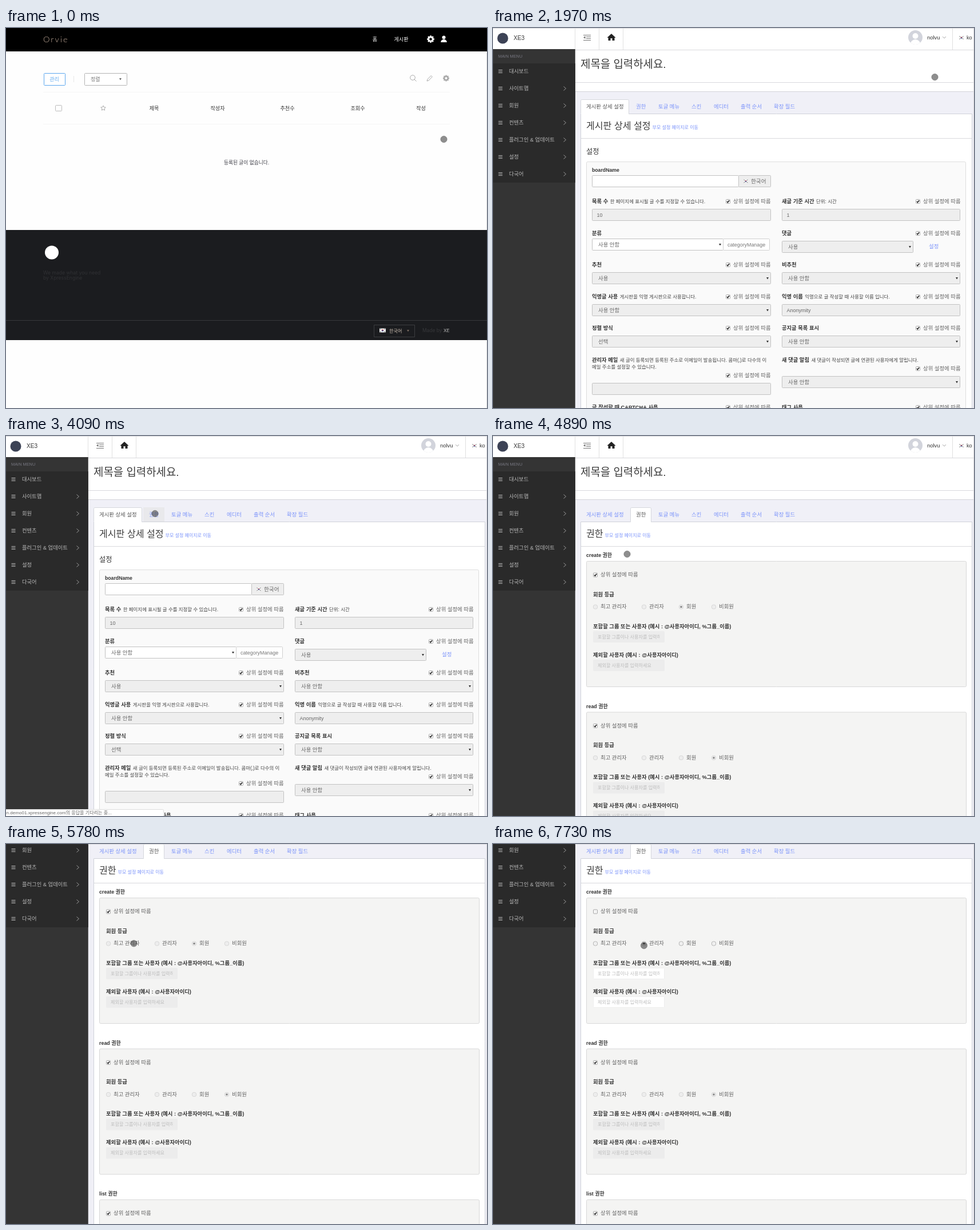
Recreate the animation shown at these times as an HTML page with a canvas. Size 841x666 px, loop 8 s.

```html
<!DOCTYPE html>
<html lang="ko">
<head>
<meta charset="utf-8">
<style>
html, body { margin: 0; width: 100%; height: 100%; overflow: hidden; background: #fff }
canvas { display: block }
</style>
</head>
<body>
<canvas id="stage" width="841" height="666"></canvas>
<script>
const W = 841, H = 666, LOOP = 8000, SIDE = 143.75;
const c = document.getElementById('stage').getContext('2d');
const SANS = '"Liberation Sans", "Noto Sans CJK KR", sans-serif';
const INTER = 'Inter, sans-serif';
const BLUE = '#7b93fa', INK = '#333', GRAY = '#626262', LINE = '#d9d9dd';

// Basic drawing helpers
function text(s, x, y, size = 9.4, color = GRAY, weight = 400, align = 'left', family = SANS) {
  c.font = `${weight} ${size}px ${family}`;
  c.fillStyle = color;
  c.textAlign = align;
  c.fillText(s, x, y);
  return c.measureText(s).width;
}
function rect(x, y, w, h, fill) {
  c.fillStyle = fill;
  c.fillRect(x, y, w, h);
}
function box(x, y, w, h, fill, border, radius = 0) {
  c.beginPath();
  c.roundRect(x + .5, y + .5, w - 1, h - 1, radius);
  c.fillStyle = fill;
  c.fill();
  stroke(border);
}
function stroke(color, width = 1) {
  c.strokeStyle = color;
  c.lineWidth = width;
  c.stroke();
}
function path(points, color, width = 1) {
  c.beginPath();
  for (let i = 0; i < points.length; i += 2) c.lineTo(points[i], points[i + 1]);
  stroke(color, width);
}
function poly(points, color) {
  c.beginPath();
  for (let i = 0; i < points.length; i += 2) c.lineTo(points[i], points[i + 1]);
  c.fillStyle = color;
  c.fill();
}
function disc(x, y, r, color, from = 0, to = 2 * Math.PI) {
  c.beginPath();
  c.arc(x, y, r, from, to);
  c.fillStyle = color;
  c.fill();
}
const caret = (x, y, color) => poly([x - 2, y - 1.5, x + 2, y - 1.5, x, y + 2], color);
const chevron = (x, y, color) => path([x - 2, y - 3.5, x + 2, y, x - 2, y + 3.5], color);

// Icons
function gear(x, y, r, color, hole) {
  for (let i = 0; i < 4; i++) {
    const a = i * Math.PI / 4, dx = r * Math.cos(a), dy = r * Math.sin(a);
    path([x - dx, y - dy, x + dx, y + dy], color, r * .45);
  }
  disc(x, y, r * .78, color);
  disc(x, y, r * .36, hole);
}
function star(x, y, r, color) {
  c.beginPath();
  for (let i = 0; i < 10; i++) {
    const a = i * Math.PI / 5 - Math.PI / 2, d = i % 2 ? r * .48 : r;
    c.lineTo(x + d * Math.cos(a), y + d * Math.sin(a));
  }
  c.closePath();
  stroke(color);
}
function flag(x, y, w = 8, h = 6) {
  rect(x - w / 2, y - h / 2, w, h, '#f4f4f4');
  disc(x, y, h / 4, '#b5424b', Math.PI, 0);
  disc(x, y, h / 4, '#34498a', 0, Math.PI);
  for (const i of [-1, 1]) for (const j of [-1, 1])
    path([x + i * w * .42, y + j * h * .42, x + i * w * .27, y + j * h * .27], '#444');
}
function checkbox(x, y, on = true) {
  box(x - 4, y - 4, 8, 8, on ? '#fff' : '#f4f4f4', '#a9a9a9', 1);
  if (on) path([x - 2, y, x - .6, y + 1.8, x + 2.2, y - 2], '#222', 1.5);
}
function radio(x, y, on, enabled) {
  disc(x, y, 4, enabled ? '#aaa' : '#d2d2d2');
  disc(x, y, 3.2, enabled ? '#f0f0f0' : '#ededed');
  if (on) disc(x, y, 1.8, enabled ? '#333' : '#888');
}

function boardPage() {
  rect(0, 0, W, H, '#fefefe');
  rect(840, 41, 1, H, '#e2e2e2');
  rect(0, 0, W, 41, '#000');
  c.letterSpacing = '2px';
  text('Orvie', 65, 25, 14.5, '#c4ac9b', 300, 'left', 'Lato, sans-serif');
  c.letterSpacing = '0px';
  text('홈', 645, 23, 9, '#fff', 500, 'center');
  text('게시판', 691, 23, 9, '#fff', 500, 'center');
  gear(742.5, 19.5, 6.3, '#fff', '#000');
  disc(765.5, 16.5, 3, '#fff');
  disc(765.5, 25, 5.3, '#fff', Math.PI, 0);

  box(66, 79, 38, 22, '#fff', '#5ba6ee', 1);
  text('관리', 84.5, 93, 9, '#62abf0', 400, 'center');
  rect(118, 84, 1, 11, '#e8e8e8');
  box(137, 79, 75, 22, '#fff', '#b4b4b4', 1);
  text('정렬', 148, 93, 9, '#777');
  caret(200, 89.5, '#666');

  c.beginPath();
  c.arc(711, 87, 4.3, 0, 7);
  stroke('#aaa');
  path([714, 90, 717.5, 93.5], '#aaa');
  c.beginPath();
  c.moveTo(736, 93);
  c.lineTo(737, 89.8); c.lineTo(743.2, 83.5); c.lineTo(745.2, 85.5); c.lineTo(739, 92);
  c.closePath();
  stroke('#aaa');
  gear(769.5, 88, 5.5, '#aaa', '#fefefe');

  rect(65, 112, 711, 1, '#f5f5f5');
  rect(65, 168, 711, 1, '#f5f5f5');
  box(86, 135, 12, 11, '#fff', '#bbb', 1);
  star(170, 140.5, 4.5, '#aaa');
  [['제목', 259], ['작성자', 370], ['추천수', 492], ['조회수', 615], ['작성', 725.5]]
    .forEach(([s, x]) => text(s, x, 144, 9.1, '#333', 400, 'center'));
  text('등록된 글이 없습니다.', 420.5, 239, 8.7, '#3b3b44', 500, 'center');

  rect(0, 354, W, 193, '#1b1c1f');
  rect(0, 512, W, 1, '#37383b');
  disc(80, 393.5, 12, '#fff');
  text('We made what you need', 65, 432, 8.6, '#303134', 400, 'left', INTER);
  text('by XpressEngine', 65, 441, 8.6, '#303134', 400, 'left', INTER);
  box(643, 520, 72, 22, '#1b1c1f', '#3c3d40');
  flag(658.5, 530, 11, 7);
  text('한국어', 670, 534, 8.1, '#d0c2b4');
  caret(703, 530.5, '#77695f');
  text('Made by', 728, 533, 8.4, '#37383b', 400, 'left', INTER);
  text('XE', 775.5, 533, 8.2, '#b9b9b9', 400, 'right', INTER);
}

const MENU = ['대시보드', '사이트맵', '회원', '컨텐츠', '플러그인 & 업데이트', '설정', '다국어'];
const TABS = [['게시판 상세 설정', 163], ['권한', 250], ['토글 메뉴', 289], ['스킨', 347],
  ['에디터', 386], ['출력 순서', 433], ['확장 필드', 491]];

function adminFrame(active, hovered) {
  rect(0, 0, W, 1000, '#fff');
  rect(0, 0, SIDE, 1, LINE);
  disc(17, 18, 9.5, '#3d4356');
  text('XE3', 36, 21, 10.1, INK);
  for (const x of [143, 185, 227, 803]) rect(x, 0, 1, 38, '#e0e0e0');
  for (let i = 0; i < 4; i++) {
    const indent = i == 1 || i == 2 ? 5 : 0;
    rect(158 + indent, 12 + i * 3, 13 - indent, 1, '#777');
  }
  poly([158, 16.5, 161.5, 14, 161.5, 19], '#777');
  poly([199.5, 17, 207, 10, 214.5, 17, 212.5, 17, 212.5, 22, 208.5, 22, 208.5, 18, 205.5, 18,
    205.5, 22, 201.5, 22, 201.5, 17], '#222');
  c.save();
  c.beginPath();
  c.arc(738.5, 16.5, 12.5, 0, 7);
  c.clip();
  rect(725, 3, 27, 27, '#d2d4dc');
  disc(738.5, 14, 5, '#fff');
  disc(738.5, 29, 9, '#fff');
  c.restore();
  text('nolvu', 759, 20, 9.4, INK);
  path([786, 15, 789, 18, 792, 15], '#aaa');
  flag(819, 17);
  text('ko', 828, 20, 9.2, INK);

  rect(SIDE, 38, W, 1, LINE);
  text('제목을 입력하세요.', 153, 70, 18.9, '#3c3c3c', 300);
  rect(SIDE, 95, W, 1, LINE);
  rect(SIDE, 111, W, 1000, '#f0f0f7');
  rect(SIDE, 111, W, 1, '#d3d3da');

  rect(0, 37, SIDE, 1000, '#343434');
  rect(0, 62, SIDE, 209, '#2a2a2a');
  text('MAIN MENU', 9, 52, 7.4, '#777781');
  MENU.forEach((s, i) => {
    const y = 76 + i * 30;
    for (const d of [-3, -.5, 2]) rect(9.5, y + d, 7, 1, '#b4b4b4');
    text(s, 28, y + 3, 9.3, '#b8b8b8');
    if (i) chevron(125.5, y, '#999');
  });

  box(153, 150, 685, 1000, '#fff', '#d0d2d9');
  if (hovered) rect(240, 125, 37, 25, '#e9e9ec');
  const [left, width] = active ? [240, 37] : [153, 85];
  box(left, 125, width, 27, '#fff', '#d5d7dd', 2);
  rect(left + 1, 150, width - 2, 3, '#fff');
  TABS.forEach(([s, x], i) => text(s, x, 141, 9.4, i == active ? '#555' : BLUE));
  const title = TABS[active][0];
  const w = text(title, 163, 177, 16.1, '#3c3c3c', 300);
  text('부모 설정 페이지로 이동', 163 + w + 3, 177, 8, BLUE);
  rect(154, 193, 683, 1, LINE);
}

function field(x, y, w, value, { select = false, off = true } = {}) {
  box(x, y, w, 21, off ? '#eee' : '#fff', '#c2c2c2', 1);
  text(value, x + (select ? 11 : 8.5), y + 14, select ? 9.4 : 9, '#666');
  if (select) caret(x + w - 6, y + 10.5, '#333');
}
function label(x, y, name, note = '') {
  const w = text(name, x, y, 9.3, INK, 700);
  text(note, x + w + 3.5, y, 8.45, '#444');
}
function inherit(x, y) {
  checkbox(x + 238, y - 3);
  text('상위 설정에 따름', x + 247, y);
}

function settingsForm() {
  const L = 173, R = 505, list = { select: true };
  text('설정', 163, 221, 12.2, INK);
  box(163, 234, 664, 800, '#fafafa', '#ddd', 2);
  text('boardName', L, 252, 8.7, INK, 700);
  box(L, 258, 257, 21, '#fff', '#c2c2c2', 1);
  box(429, 258, 57, 21, '#eee', '#c2c2c2', 1);
  flag(442, 268.5);
  text('한국어', 451, 272, 9.6, '#666');

  const rows = [
    [L, 0, '목록 수', '한 페이지에 표시될 글 수를 지정할 수 있습니다.', '10'],
    [R, 0, '새글 기준 시간', '단위: 시간', '1'],
    [L, 2, '추천', '', '사용', list],
    [R, 2, '비추천', '', '사용 안함', list],
    [L, 3, '익명글 사용', '게시판을 익명 게시판으로 사용합니다.', '사용 안함', list],
    [R, 3, '익명 이름', '익명으로 글 작성할 때 사용할 이름 입니다.', 'Anonymity'],
    [L, 4, '정렬 방식', '', '선택', list],
    [R, 4, '공지글 목록 표시', '', '사용 안함', list],
    [L, 6.5, '글 작성할 때 CAPTCHA 사용', '', ''],
    [R, 6.5, '태그 사용', '', '']
  ];
  for (const [x, row, name, note, value, kind] of rows) {
    const y = Math.round(307 + row * 55.5);
    label(x, y, name, note);
    inherit(x, y);
    field(x, y + 10, x == L ? 313 : 312, value, kind);
  }
  label(L, 363, '분류');
  field(L, 369, 230, '사용 안함', { select: true, off: false });
  box(402, 369, 82, 21, '#fff', '#d0d0d0', 1);
  text('categoryManage', 410, 383, 8.9, '#777');
  label(R, 363, '댓글');
  inherit(R, 363);
  field(R, 373, 230, '사용', list);
  text('설정', 762, 386, 9.4, BLUE);

  label(L, 585, '관리자 메일', '새 글이 등록되면 등록된 주소로 이메일이 발송됩니다. 콤마(,)로 다수의 이');
  text('메일 주소를 설정할 수 있습니다.', L, 597, 8.45, '#444');
  inherit(L, 612);
  field(L, 622, 313, '');
  label(R, 585, '새 댓글 알림', '새 댓글이 작성되면 글에 연관된 사용자에게 알립니다.');
  inherit(R, 600);
  field(R, 610, 312, '사용 안함', list);
}

function hintField(y, hint, enabled) {
  c.save();
  box(175, y, 125, 20, enabled ? '#fff' : '#ececec', enabled ? '#eee' : '#ececec', 1);
  c.beginPath();
  c.rect(183, y, 109, 20);
  c.clip();
  text(hint, 183, y + 12.5, 8.1, '#bcbcbc');
  c.restore();
}
function permission(name, y, chosen, enabled) {
  text(name + ' 권한', 163, y + 212, 8.9, INK, 700);
  box(163, y + 219, 665, 221, '#f4f4f3', '#d8d8d8', 2);
  checkbox(179, y + 243.5, !enabled);
  text('상위 설정에 따름', 188, y + 246);
  text('회원 등급', 175, y + 280.5, 9.3, INK, 700);
  [['최고 관리자', 179], ['관리자', 264], ['회원', 329], ['비회원', 386]].forEach(([s, x], i) => {
    radio(x, y + 299.5, i == chosen, enabled);
    text(s, x + 9, y + 302);
  });
  text('포함할 그룹 또는 사용자 (예시 : @사용자아이디, %그룹_이름)', 175, y + 336.5, 9.33, INK, 700);
  hintField(y + 342, '포함할 그룹이나 사용자를 입력하세요', enabled);
  text('제외할 사용자 (예시 : @사용자아이디)', 175, y + 386.5, 9.33, INK, 700);
  hintField(y + 392, '제외할 사용자를 입력하세요', enabled);
}

function statusBar() {
  box(-2, 654, 278, 14, '#fff', '#ddd', 2);
  text('qorun.demo01.xpressengine.com의 응답을 기다리는 중...', 185, 663, 8.1, '#666', 400, 'right');
}

// Motion
const clamp = p => Math.min(1, Math.max(0, p));
const smooth = p => p * p * (3 - 2 * p);
const easeOut = p => 1 - (1 - p) ** 2.4;
const ramp = (t, a, b) => smooth(clamp((t - a) / (b - a)));

// start, end, control point, destination, easing
const MOVES = [
  [15, 80, 765, 190, 765, 186],
  [200, 910, 766, 130, 772, 86],
  [2230, 3060, 530, 280, 289, 135],
  [3080, 3350, 275, 134, 260, 134],
  [3760, 3870, 257, 135, 260, 136],
  [4140, 4890, 255, 185, 234, 207],
  [4910, 5290, 240, 232, 262.5, 232],
  [5330, 5730, 258, 210, 235, 191],
  [5730, 6220, 209, 155, 184.5, 119.5, easeOut],
  [6560, 7380, 215, 145, 263.5, 178]
];
function cursor(t) {
  let x = 765, y = 195;
  for (const [a, b, cx, cy, ex, ey, ease = smooth] of MOVES) {
    if (t < a) break;
    const p = ease(clamp((t - a) / (b - a))), q = 1 - p;
    x = q * q * x + 2 * p * q * cx + p * p * ex;
    y = q * q * y + 2 * p * q * cy + p * p * ey;
  }
  disc(x + .5, y, 5.7, 'rgba(60,60,60,.58)');
  stroke('rgba(80,80,80,.4)');
}

function draw(t) {
  if (t < 1970) {
    boardPage();
  } else {
    const permissions = t >= 4290;
    const scroll = Math.round(62.5 * (ramp(t, 5190, 5350) + ramp(t, 5400, 5600)));
    c.save();
    c.translate(0, -scroll);
    adminFrame(permissions ? 1 : 0, !permissions && t >= 4090);
    if (permissions) {
      permission('create', 0, t < 7590 ? 2 : 1, t >= 6370);
      permission('read', 264.5, 3, false);
      permission('list', 529, 3, false);
    } else settingsForm();
    c.restore();
    rect(SIDE, 0, W, 1, LINE);
    rect(840, 0, 1, H, '#dcdce0');
    if (t >= 4090 && !permissions) statusBar();
  }
  cursor(t);
}

function tick() {
  draw(performance.now() % LOOP);
  requestAnimationFrame(tick);
}
tick();
</script>
</body>
</html>
```
